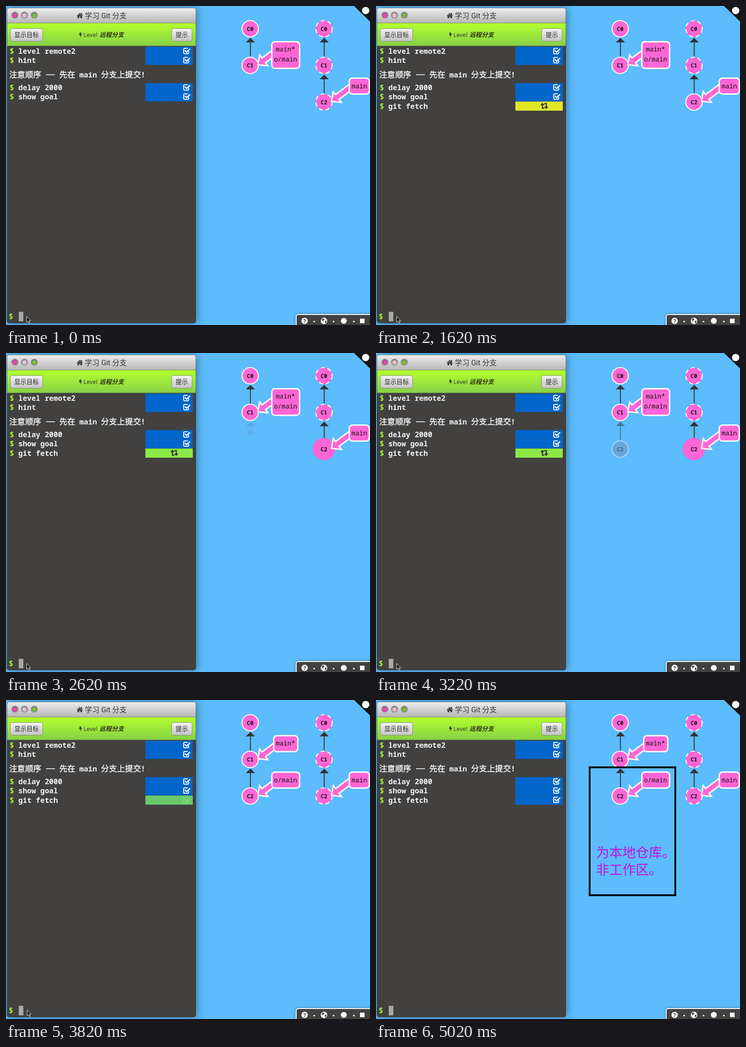
An HTML page with a canvas that plays this animation: 799x701 px, repeating every 7.02 s.

```html
<!DOCTYPE html>
<html lang="zh">
<head>
<meta charset="utf-8">
<title>学习 Git 分支</title>
<style>
  html, body { margin: 0; width: 100%; height: 100%; overflow: hidden; background: #5cbcfc; }
  canvas { display: block; }
</style>
</head>
<body>
<canvas id="stage" width="799" height="701"></canvas>
<script>
const ctx = document.getElementById('stage').getContext('2d');
const LOOP = 7020;
const BEATS = [0, 820, 1230, 1420, 1620, 1820, 2020, 2240, 2420, 2620, 2820,
  3020, 3220, 3420, 3620, 3820, 4020, 4220, 4420, 4640, 5020];

const MONO = '"Noto Sans Mono", "DejaVu Sans Mono", monospace';
const CJK = '"Noto Sans CJK SC", "Noto Sans CJK JP", sans-serif';
const SANS = 'Roboto, ' + CJK;
const OPEN = '"Open Sans", ' + CJK;
const CODE = '600 16.1px ' + MONO;

const DARK = '#424140', LIME = '#adff2f', INK = '#333', PAPER = '#f2f2f2';
const SKY = [92, 188, 252], PINK = [255, 102, 213], WHITE = [255, 255, 255];
const YELLOW = [224, 230, 38], GREEN = [140, 232, 70], BLUE = [0, 102, 204];
const GREY = [120, 145, 186];

const rgb = c => `rgb(${c.map(Math.round).join()})`;
const lerp = (a, b, k) => a + (b - a) * k;
const mix = (a, b, k) => a.map((v, i) => lerp(v, b[i], k));
const ramp = (t, from, to) => Math.min(1, Math.max(0, (t - from) / (to - from)));
const easeOut = (x, power) => 1 - Math.pow(1 - x, power);

// ---------- helpers ----------
function text(str, x, y, font, color, align = 'left') {
  ctx.font = font;
  ctx.textAlign = align;
  ctx.fillStyle = color;
  ctx.fillText(str, x, y);
}

function rect(x, y, w, h, color) {
  ctx.fillStyle = color;
  ctx.fillRect(x, y, w, h);
}

function trace(points, close = true) {
  ctx.beginPath();
  points.forEach(([x, y]) => ctx.lineTo(x, y));
  if (close) ctx.closePath();
}

function poly(points, color) {
  trace(points);
  ctx.fillStyle = color;
  ctx.fill();
}

function line(points, color, width) {
  trace(points, false);
  ctx.strokeStyle = color;
  ctx.lineWidth = width;
  ctx.stroke();
}

function rounded(x, y, w, h, r) {
  ctx.beginPath();
  ctx.roundRect(x, y, w, h, r);
}

function disc(x, y, r, color) {
  ctx.beginPath();
  ctx.arc(x, y, r, 0, Math.PI * 2);
  ctx.fillStyle = color;
  ctx.fill();
}

function fade(y0, y1, top, bottom) {
  const g = ctx.createLinearGradient(0, y0, 0, y1);
  g.addColorStop(0, top);
  g.addColorStop(1, bottom);
  return g;
}

function withAlpha(a, draw) {
  ctx.save();
  ctx.globalAlpha = a;
  draw();
  ctx.restore();
}

// ---------- window ----------
function button(x, w, label) {
  rounded(x + .5, 49.5, w - 1, 28, 4);
  ctx.fillStyle = fade(49, 78, '#f4f4f4', '#c2c2c2');
  ctx.fill();
  ctx.strokeStyle = '#808a70';
  ctx.lineWidth = 1;
  ctx.stroke();
  text(label, x + w / 2, 68, '13.4px ' + CJK, '#222', 'center');
}

function trafficLight(x, color) {
  disc(x, 20.5, 8, '#8d8d8d');
  disc(x, 21, 7, '#d5d5d5');
  disc(x, 20.5, 6.3, '#6e5f68');
  disc(x, 20.8, 5, color);
}

function windowFrame() {
  ctx.save();
  ctx.shadowColor = 'rgba(0,0,0,.38)';
  ctx.shadowBlur = 18;
  ctx.shadowOffsetX = 2;
  rounded(2, 4, 415, 693, 5);
  ctx.fillStyle = DARK;
  ctx.fill();
  ctx.restore();

  rounded(2, 4, 415, 34, [5, 5, 0, 0]);
  ctx.fillStyle = fade(4, 37, '#eeeeee', '#b8b8b8');
  ctx.fill();
  rect(2, 37, 415, 1, '#7f8a66');
  rect(2, 38, 415, 50, fade(38, 88, '#b3ff2d', '#86d046'));
  rect(2, 87, 415, 1, '#6f9a48');
  rounded(2.5, 4.5, 414, 692, 5);
  ctx.strokeStyle = 'rgba(40,40,40,.45)';
  ctx.lineWidth = 1;
  ctx.stroke();

  trafficLight(19.5, '#e846ae');
  trafficLight(40.5, '#e0c3d2');
  trafficLight(62, '#7cc032');

  // house
  poly([[155, 21.5], [162, 15], [169, 21.5], [168, 22.5], [162, 17], [156, 22.5]], INK);
  poly([[157, 22.5], [162, 18], [167, 22.5], [167, 27], [163.5, 27], [163.5, 23.5],
    [160.5, 23.5], [160.5, 27], [157, 27]], INK);
  rect(165, 15.5, 2, 4, INK);
  text('学习 Git 分支', 173, 27, '16px ' + SANS, INK);

  button(9, 72, '显示目标');
  button(363, 46, '提示');
  poly([[162, 58], [165, 58], [164, 61.5], [167, 61], [162.5, 70], [163.5, 64], [160.5, 64.5]], INK);
  text('Level', 170, 68, '13px ' + OPEN, INK);
  text('远程分支', 205, 68, 'italic bold 13.4px ' + CJK, '#2a3318');
}

function checkIcon(y) {
  ctx.beginPath();
  ctx.moveTo(399, y - 6);
  ctx.arcTo(390, y - 6, 390, y + 6, 2.5);
  ctx.arcTo(390, y + 6, 401, y + 6, 2.5);
  ctx.arcTo(401, y + 6, 401, y, 2.5);
  ctx.lineTo(401, y + 1);
  ctx.strokeStyle = '#fff';
  ctx.lineWidth = 2;
  ctx.stroke();
  line([[392.5, y - 1.5], [396.5, y + 2.3], [404, y - 4.8]], '#fff', 2.8);
}

function swapIcon(x, y, angle) {
  ctx.save();
  ctx.translate(x, y);
  ctx.rotate(angle);
  for (let i = 0; i < 2; i++) {
    line([[-4.2, -3], [-4.2, 5], [0, 5]], INK, 2.4);
    poly([[-8.7, -1.5], [-4.2, -7], [.3, -1.5]], INK);
    ctx.rotate(Math.PI);
  }
  ctx.restore();
}

function command(str, y) {
  text('$', 8, y + 6, CODE, LIME);
  text(str, 27, y + 6, CODE, PAPER);
}

function doneCommand(str, y) {
  command(str, y);
  rect(306, y - 9.5, 104, 20, rgb(BLUE));
  checkIcon(y);
}

function fetchRow(t) {
  command('git fetch', 220);
  const running = mix(YELLOW, GREEN, ramp(t, 1620, 2020));
  rect(306, 210, 104, 20, rgb(mix(running, BLUE, ramp(t, 3620, 4420))));
  if (t < 1620) swapIcon(344, 220, Math.PI / 2);
  else if (t < 3820) swapIcon(369.5, 219.5, 0);
  else withAlpha(ramp(t, 3620, 4640), () => checkIcon(219.5));
}

// Slightly emboldened Chinese text.
function note(str, x, y) {
  text(str, x, y, '17.6px ' + CJK, PAPER);
  ctx.strokeStyle = PAPER;
  ctx.lineWidth = .5;
  ctx.strokeText(str, x, y);
}

function terminal(t) {
  doneCommand('level remote2', 99);
  doneCommand('hint', 119);
  note('注意顺序', 7, 157);
  line([[88, 151], [107.5, 151]], PAPER, 1.7);
  note('先在', 117, 157);
  text('main', 161, 156.5, CODE, PAPER);
  note('分支上提交', 208.5, 157);
  text('!', 296, 156.5, CODE, PAPER);
  doneCommand('delay 2000', 179);
  doneCommand('show goal', 199);
  if (t >= 1230) fetchRow(t);

  const typed = t >= 820 && t < 1230 ? 'git fetch' : '';
  text('$', 6, 688, CODE, LIME);
  text(typed, 27, 688, CODE, PAPER);
  rect(28 + typed.length * 9.55, 672, 10, 21, '#aaa9a8');
}

function pointer(t) {
  if (t >= 4420) return;
  if (t >= 820 && t < 1230) {
    line([[42, 676], [48, 676]], '#111', 1);
    line([[45, 676], [45, 689]], '#111', 1);
    line([[42, 689], [48, 689]], '#111', 1);
    return;
  }
  const [x, y] = t < 3420 ? [45.5, 682] : t < 4220 ? [46.5, 681] : [63.5, 680];
  const shape = [[0, 0], [0, 13], [3, 10.3], [5, 15], [7, 14], [5, 9.6], [8.5, 9.4]]
    .map(([dx, dy]) => [x + dx, y + dy]);
  poly(shape, '#111');
  trace(shape);
  ctx.strokeStyle = '#e8e8e8';
  ctx.lineWidth = 1;
  ctx.stroke();
}

// ---------- commit graph ----------
function edge(x, parentY, childTop) {
  const tip = parentY + 20;
  if (childTop > tip + 9) line([[x, tip + 8], [x, childTop]], INK, 2);
  poly([[x, tip], [x + 10, tip + 10], [x - 10, tip + 10]], INK);
}

function node(x, y, name, { dashed = false, fill = PINK, scale = 1, glow = 0 } = {}) {
  ctx.save();
  ctx.translate(x, y);
  ctx.scale(scale, scale);
  disc(0, 0, 18, rgb(fill));
  const width = lerp(2.2, 13, glow);
  ctx.strokeStyle = rgb(mix(WHITE, PINK, glow));
  ctx.lineWidth = width;
  if (dashed) ctx.setLineDash([4 * width, 3 * width]);
  ctx.beginPath();
  ctx.arc(0, 0, 18, 0, Math.PI * 2);
  ctx.stroke();
  text(name, 0, 4.5, 'bold 12px ' + MONO, '#111', 'center');
  ctx.restore();
}

function outlined() {
  ctx.fillStyle = rgb(PINK);
  ctx.fill();
  ctx.strokeStyle = '#fff';
  ctx.lineWidth = 3;
  ctx.stroke();
}

// Arrow from a commit into the label box.
function flag(tipX, tipY, x, y, w, h) {
  const dx = .8, dy = -.6;
  const at = (along, side) => [tipX + along * dx - side * dy, tipY + along * dy + side * dx];
  trace([at(0, 0), at(16, -15), at(16, -6.5), at(67, -6.5), at(67, 6.5), at(16, 6.5), at(16, 15)]);
  outlined();
  rounded(x, y, w, h, 7);
  outlined();
}

function branchName(str, x, y) {
  text(str, x, y + 5, '14.1px ' + MONO, '#111', 'center');
}

function localTree(t, move) {
  const x = 536.5;
  edge(x, 50, 111);
  const age = ramp(t, 2440, 3220);
  if (age > 0) {
    const grow = easeOut(age, 3);
    const y = lerp(130, 211, grow);
    withAlpha(.48 * age + .52 * move * move, () => {
      edge(x, 130.5, y - 19 * grow);
      node(x - .5, y, 'C2', { scale: grow, fill: mix(GREY, PINK, ramp(move, .42, 1)) });
    });
  }
  node(536, 50, 'C0');
  node(536, 130.5, 'C1');

  flag(553, 129, lerp(583.5, 587.5, move), 78.5, lerp(61, 53, move), lerp(58.5, 35, move));
  branchName('main*', 613.5, 95);
  if (move > 0) {
    withAlpha(move, () =>
      flag(553, lerp(129, 209.5, move), 583.5, lerp(99.5, 158.5, move), 61, lerp(58.5, 35, move)));
  }
  branchName('o/main', 613.5, lerp(116.5, 175.5, move));
}

function remoteTree(t, move) {
  const x = 698.5;
  edge(x, 50, 111);
  edge(x, 131, 192);
  node(698, 50, 'C0', { dashed: true });
  node(698, 130.5, 'C1', { dashed: true });
  const glow = easeOut(ramp(t, 1620, 2240), 1.6) * (1 - move);
  node(698, 211, 'C2', { dashed: t < 1620 || t >= 3420, glow });
  flag(714.5, 209.5, 753.5, 158.5, 44, 35);
  branchName('main', 775.5, 175.5);
}

// ---------- corners ----------
function corners() {
  poly([[764, 0], [799, 0], [799, 34]], '#151513');
  disc(789.5, 10, 8, '#fff');

  ctx.save();
  ctx.shadowColor = 'rgba(0,0,0,.5)';
  ctx.shadowBlur = 6;
  rounded(637, 678, 180, 40, 5);
  ctx.fillStyle = DARK;
  ctx.fill();
  ctx.restore();
  ctx.strokeStyle = '#fff';
  ctx.lineWidth = 2;
  ctx.stroke();

  disc(655.5, 692, 7, '#fff');
  text('?', 655.5, 696.5, 'bold 12px ' + OPEN, DARK, 'center');
  [676.5, 719, 763.5].forEach(x => disc(x, 693.5, 1.8, '#fff'));
  disc(698, 692, 7.2, '#fff');
  poly([[693, 688], [697, 686.5], [699, 689], [696, 691], [697, 693], [694, 692]], DARK);
  poly([[700, 692], [703.5, 691], [703, 695], [700, 697.5]], DARK);
  disc(741.5, 692, 6.5, '#fff');
  rect(777, 687, 10, 10, '#fff');
}

function callout() {
  ctx.strokeStyle = '#000';
  ctx.lineWidth = 4;
  ctx.strokeRect(469, 148, 188, 281);
  const font = '300 29px ' + CJK, violet = '#c010e2';
  text('为本地仓库。', 483, 346, font, violet);
  text('非工作区。', 483, 384, font, violet);
}

function draw(t) {
  rect(0, 0, 799, 701, rgb(SKY));
  windowFrame();
  terminal(t);
  const move = easeOut(ramp(t, 3240, 3800), 1.4);
  localTree(t, move);
  remoteTree(t, move);
  corners();
  if (t >= 5020) callout();
  pointer(t);
}

// Each picture holds until the next beat.
let shown = -1;
function tick() {
  const now = performance.now() % LOOP;
  const beat = BEATS.filter(b => b <= now).pop();
  if (beat !== shown) draw(shown = beat);
  requestAnimationFrame(tick);
}
tick();
</script>
</body>
</html>
```
